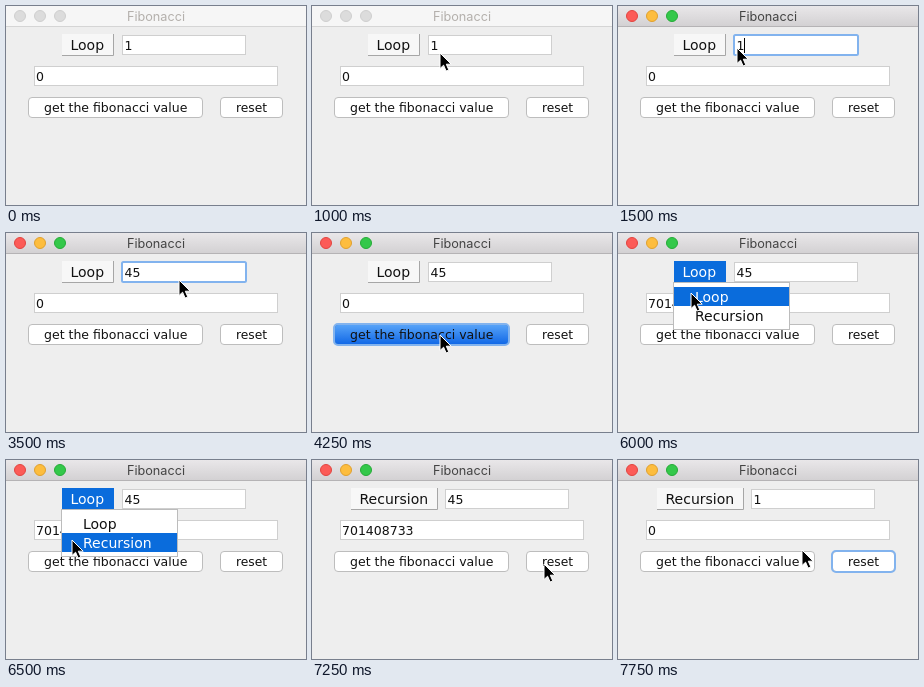
Write an HTML page that moves like this. It is 300 px wide and 199 px high and loops after 8 s.

```html
<!DOCTYPE html>
<html lang="en">
<head>
<meta charset="utf-8">
<title>Fibonacci</title>
<style>
  html, body { margin: 0; width: 100%; height: 100%; overflow: hidden; background: #eee; }
  svg { display: block; width: 300px; height: 199px; }
  text { font: 12.5px "DejaVu Sans", sans-serif; fill: #111; white-space: pre; }
  .big { font-size: 14px; }
  .title { font: 12.7px Inter, sans-serif; text-anchor: middle; }
  .field { fill: #fff; stroke: #cfcfcf; }
  .ring { fill: none; stroke: #82b3ee; stroke-width: 2; }
  .button { fill: #fff; stroke: #bdbdbd; }
  .pressed { fill: url(#press); stroke: #2b78dc; }
</style>
</head>
<body>
<svg viewBox="0 0 300 199">
  <defs>
    <linearGradient id="bar" x2="0" y2="1">
      <stop stop-color="#e9e7e9"/><stop offset="1" stop-color="#d3d1d3"/>
    </linearGradient>
    <linearGradient id="press" x2="0" y2="1">
      <stop stop-color="#58a4f8"/><stop offset="1" stop-color="#1067e6"/>
    </linearGradient>
  </defs>
  <rect width="300" height="199" fill="#eee"/>
  <rect id="bar-bg" width="300" height="20"/>
  <rect id="bar-line" y="20" width="300" height="1"/>
  <g id="lights" stroke-width="1">
    <circle cx="14" cy="10" r="5.5"/><circle cx="34" cy="10" r="5.5"/><circle cx="54" cy="10" r="5.5"/>
  </g>
  <text id="title" class="title" x="150" y="14.5">Fibonacci</text>

  <rect id="combo" y="28" height="21"/>
  <path id="combo-edge" fill="none" stroke="#a6a6a6"/>
  <text id="mode" class="big" y="44"></text>

  <g id="count">
    <rect class="field" x="116.5" y="29.5" width="123" height="19"/>
    <rect id="field-ring" class="ring" x="116" y="29" width="124" height="20" rx="1.5"/>
    <rect id="selection" x="119" y="32" width="8" height="15" fill="#a5cdff"/>
    <text id="input" x="118.5" y="44"></text>
    <rect id="caret" y="32" width="1" height="15"/>
  </g>

  <rect class="field" x="28.5" y="60.5" width="243" height="19"/>
  <text id="result" x="30" y="75"></text>

  <rect id="get" x="22.5" y="91.5" width="174" height="20" rx="3.5"/>
  <rect id="get-ring" class="ring" x="22" y="91" width="175" height="21" rx="4"/>
  <text x="38" y="106">get the fibonacci value</text>
  <rect id="reset" x="214.5" y="91.5" width="62" height="20" rx="3.5"/>
  <rect id="reset-ring" class="ring" x="214" y="91" width="63" height="21" rx="4"/>
  <text x="230" y="106" style="font-size:12.3px">reset</text>

  <g id="menu">
    <rect x="55.5" y="49.5" width="116" height="47" fill="#fff" stroke="#bcbcbc"/>
    <rect id="hover" x="56" width="115" height="19" fill="#0a6cdc"/>
    <text id="item0" class="big" x="77" y="69">Loop</text>
    <text id="item1" class="big" x="77" y="88">Recursion</text>
  </g>

  <path id="cursor" d="M0 0V15.5L3.6 12.2L6.1 18L8.8 16.9L6.3 11.2H11.2Z"
        fill="#000" stroke="#fff" stroke-width="1"/>
</svg>
<script>
const LOOP = 8000;
const $ = id => document.getElementById(id);
const set = (id, attrs) => {
  for (const key in attrs) $(id).setAttribute(key, attrs[key]);
};
const show = (id, on) => set(id, { visibility: on ? "visible" : "hidden" });

// Each step overrides part of the state left by the steps before it.
const start = {
  active: false, mode: "Loop", input: "1", result: "0", focus: "", press: "",
  selected: false, caret: false, hover: -1, at: null
};
const steps = [
  [0, {}],
  [500, { at: [168, 70] }],
  [750, { at: [148, 60] }],
  [1000, { at: [128, 47] }],
  [1250, { at: [119, 42], active: true, focus: "field" }],
  [1500, { caret: true }],
  [1750, { at: [125, 43], caret: false, selected: true }],
  [2000, { at: [153, 46] }],
  [2250, { at: [173, 47] }],
  [2750, { input: "4", selected: false, caret: true }],
  [3000, { input: "45" }],
  [3500, { caret: false }],
  [3750, { at: [158, 72] }],
  [4000, { at: [130, 101] }],
  [4250, { at: [128, 102], focus: "", press: "get" }],
  [4500, { press: "", focus: "get", result: "701408733" }],
  [5250, { at: [98, 70] }],
  [5500, { at: [77, 44] }],
  [5750, { focus: "", hover: 0 }],
  [6000, { at: [73, 60] }],
  [6250, { at: [67, 77], hover: 1 }],
  [6500, { at: [66, 80] }],
  [6750, { hover: -1, mode: "Recursion" }],
  [7000, { at: [140, 92] }],
  [7250, { at: [232, 104] }],
  [7500, { at: [236, 105], press: "reset" }],
  [7750, { at: [184, 90], press: "", focus: "reset", input: "1", result: "0" }]
];
let last = start;
const states = steps.map(([time, change]) => {
  last = { ...last, ...change };
  return { time, ...last };
});

const lightColors = [["#fc5b57", "#e2443f"], ["#fdbd3e", "#e0a02e"], ["#34c84a", "#25ab37"]];

function draw(s) {
  set("bar-bg", { fill: s.active ? "url(#bar)" : "#f6f6f6" });
  set("bar-line", { fill: s.active ? "#b5b3b5" : "#d5d5d5" });
  set("title", { style: `fill:${s.active ? "#444" : "#b4b0ac"}` });
  [...$("lights").children].forEach((light, i) => {
    const [fill, edge] = s.active ? lightColors[i] : ["#dcdcdc", "#cfcfcf"];
    light.setAttribute("fill", fill);
    light.setAttribute("stroke", edge);
  });

  const open = s.hover >= 0, wide = s.mode === "Recursion";
  const left = wide ? 39 : 56, width = wide ? 87 : 52, right = left + width - 0.5;
  set("combo", { x: left, width, fill: open ? "#0a6cdc" : "#f7f7f7" });
  set("combo-edge", { d: `M${left} 49.5H${right}V28` });
  show("combo-edge", !open);
  set("mode", { x: left + 8.5, style: `fill:${open ? "#fff" : "#111"}` });
  $("mode").textContent = s.mode;

  set("count", { transform: `translate(${wide ? 17 : 0} 0)` });
  $("input").textContent = s.input;
  $("result").textContent = s.result;
  show("selection", s.selected);
  show("caret", s.caret);
  set("caret", { x: 118 + 8 * s.input.length });

  for (const id of ["field", "get", "reset"]) show(id + "-ring", s.focus === id || s.press === id);
  for (const id of ["get", "reset"]) set(id, { class: s.press === id ? "pressed" : "button" });

  set("menu", { display: open ? "inline" : "none" });
  set("hover", { y: s.hover === 1 ? 73 : 54 });
  for (const i of [0, 1]) set("item" + i, { style: `fill:${s.hover === i ? "#fff" : "#111"}` });

  show("cursor", s.at);
  if (s.at) set("cursor", { transform: `translate(${s.at})` });
}

let shown;
function tick() {
  const time = performance.now() % LOOP;
  const state = states.filter(s => s.time <= time).pop();
  if (state !== shown) draw(shown = state);
  requestAnimationFrame(tick);
}
tick();
</script>
</body>
</html>
```
